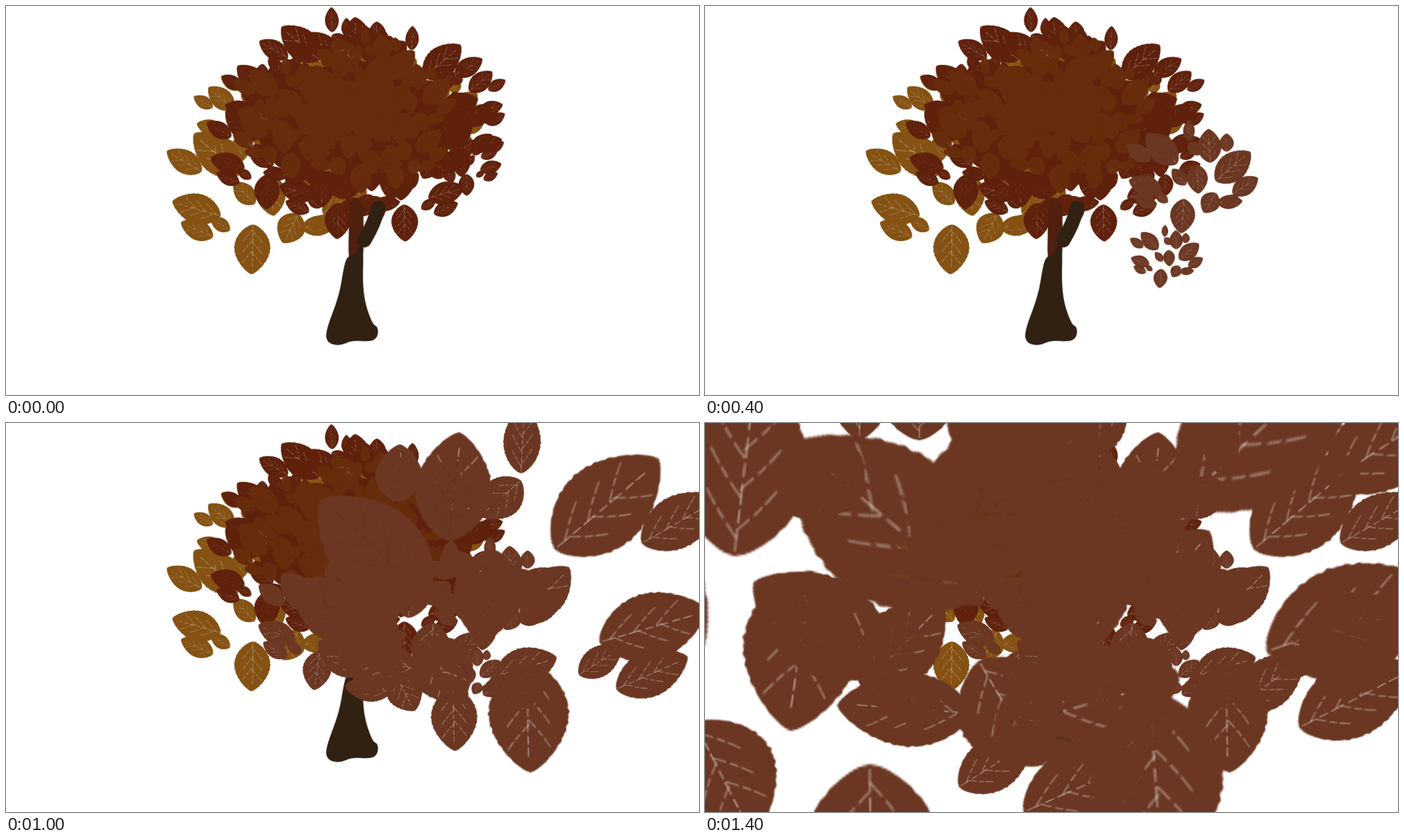
An HTML page with a canvas that plays this animation: 998 by 561 pixels, repeating every 1600 ms.

```html
<!DOCTYPE html>
<html lang="en">
<head>
<meta charset="utf-8">
<title>Autumn tree</title>
<style>
html, body { margin: 0; width: 100%; height: 100%; overflow: hidden; background: #fff; }
canvas { display: block; width: 998px; height: 561px; }
</style>
</head>
<body>
<canvas id="stage" width="998" height="561"></canvas>
<script>
const ctx = document.getElementById('stage').getContext('2d');
const STEP = 200, STEPS = 8, LEN = 80, PAD = 5;

// One leaf, pointing right; the veins are cut out so whatever lies below shows.
function makeLeaf(color) {
  const c = document.createElement('canvas');
  c.width = c.height = LEN + 2 * PAD;
  const g = c.getContext('2d');
  g.translate(PAD, PAD + LEN / 2);
  const edge = x => LEN / 2 * Math.sin(Math.PI * x ** 0.9) ** 0.7 *
    (1 + 0.012 * Math.sin(x * 71) + 0.012 * Math.sin(x * 113));
  g.beginPath();
  for (let i = 0; i <= 80; i++) g.lineTo(LEN * i / 80, -edge(i / 80));
  for (let i = 79; i > 0; i--) g.lineTo(LEN * i / 80, edge(i / 80));
  g.fillStyle = color;
  g.fill();

  g.globalCompositeOperation = 'destination-out';
  g.lineCap = 'round';
  g.lineWidth = 1.2;
  g.setLineDash([8, 4, 5, 3]);
  const vein = (x0, y0, x1, y1, alpha) => {
    g.strokeStyle = `rgba(0,0,0,${alpha})`;
    g.beginPath();
    g.moveTo(x0 * LEN, y0 * LEN);
    g.quadraticCurveTo((x0 + x1) / 2 * LEN, (y0 + (y1 - y0) * 0.6) * LEN, x1 * LEN, y1 * LEN);
    g.stroke();
  };
  vein(0.03, 0, 0.85, 0.02, 0.45);
  for (const x of [0.12, 0.34, 0.55])
    for (const side of [-1, 1]) vein(x + 0.02 * side, 0, x + 0.24, side * 0.27, 0.33);
  return c;
}

const red = makeLeaf('#5f210c'), mid = makeLeaf('#662c0b');
const gold = makeLeaf('#855213'), brown = makeLeaf('#6b3722');

// The brush motif: stem end, tip and width ratio of each leaf,
// measured from the middle of the lowest one.
const MOTIF = [
  [-1, -46, 2, 46, 0.72], [59, -62, 148, -89, 0.6], [73, -23, 132, -50, 0.58],
  [42, -35, 77, -58, 0.6], [94, -144, 158, -182, 0.58], [22, -139, 108, -214, 0.62],
  [-6, -202, -4, -258, 0.55], [-6, -196, -39, -166, 0.75], [-66, -146, -57, -236, 0.7],
  [-108, -178, -106, -226, 0.8], [-83, -98, -172, -180, 0.63], [-130, -66, -195, -112, 0.62],
  [-90, -40, -157, -48, 0.55], [-85, -66, -56, -12, 0.85], [-29, -139, -39, -62, 0.72],
  [-104, -40, -146, -62, 0.5], [-4, -84, 34, -124, 0.65]
];

function leaf(sprite, [x0, y0, x1, y1, w]) {
  const dx = x1 - x0, dy = y1 - y0, k = Math.hypot(dx, dy) / LEN;
  ctx.save();
  ctx.translate(x0, y0);
  ctx.rotate(Math.atan2(dy, dx));
  ctx.scale(k, k * w);
  ctx.drawImage(sprite, -PAD, -PAD - LEN / 2);
  ctx.restore();
}

// flip is 1 or -1
function stamp(sprite, x, y, size, flip = 1, turn = 0) {
  ctx.save();
  ctx.translate(x, y);
  ctx.rotate(turn);
  ctx.scale(size * flip, size);
  MOTIF.forEach(l => leaf(sprite, l));
  ctx.restore();
}

function seeded(seed) {
  return () => {
    seed = (seed * 16807) % 2147483647;
    return seed / 2147483647;
  };
}

// Stamps spread evenly over the middle of the crown
function scatter(sprite, count, size, seed) {
  const rnd = seeded(seed);
  for (let i = 0; i < count; i++) {
    const a = i * 2.4 + rnd(), r = Math.sqrt((i + 0.5) / count);
    const s = size * (0.85 + 0.3 * rnd()), flip = rnd() < 0.5 ? -1 : 1;
    const x = 490 + 118 * r * Math.cos(a), y = 162 + 70 * r * Math.sin(a);
    stamp(sprite, x + 20 * s * flip, y + 95 * s, s, flip);
  }
}

const crown = [
  [588, 189, 0.62], [466, 167, 0.64, -1], [659, 176, 0.38], [382, 183, 0.45, -1],
  [574, 313, 0.58], [478, 310, 0.57, -1], [655, 228, 0.4], [663, 258, 0.34],
  [376, 268, 0.55, -1]
];

// One more of these lands at every step
const sprays = [
  [656, 393, 0.3, -1, 0.07], [688, 303, 0.54, -1, 0.05], [448, 357, 0.62, -1, 0.12],
  [645, 427, 1], [752, 424, 1.74], [650, 518, 2.88, 1, -0.06], [240, 630, 3]
];

function blob(color, points) {
  const n = points.length;
  ctx.fillStyle = color;
  ctx.beginPath();
  for (let i = 0; i <= n; i++) {
    const [x, y] = points[i % n], [nx, ny] = points[(i + 1) % n];
    const mx = (x + nx) / 2, my = (y + ny) / 2;
    if (i) ctx.quadraticCurveTo(x, y, mx, my);
    else ctx.moveTo(mx, my);
  }
  ctx.fill();
}

function trunk() {
  ctx.save();
  ctx.shadowColor = 'rgba(48,33,18,.6)';
  ctx.shadowBlur = 2;
  blob('#4f200e', [[494, 279], [514, 279], [515, 325], [514, 375], [493, 375], [494, 320]]);
  blob('#302113', [
    [491, 361], [504, 359], [507, 347], [515, 345], [513, 415], [527, 459],
    [536, 463], [535, 478], [525, 484], [498, 482], [481, 490], [463, 486],
    [460, 470], [480, 418], [486, 380]
  ]);
  ctx.strokeStyle = '#302113';
  ctx.lineCap = 'round';
  ctx.lineWidth = 20;
  ctx.beginPath();
  ctx.moveTo(536, 291);
  ctx.quadraticCurveTo(531, 313, 516, 338);
  ctx.stroke();
  ctx.restore();
}

function draw(step) {
  ctx.fillStyle = '#fff';
  ctx.fillRect(0, 0, 998, 561);
  stamp(gold, 355, 351, 0.78, -1);
  stamp(gold, 337, 207, 0.42, -1);
  scatter(gold, 6, 0.52, 5);
  scatter(red, 9, 0.5, 11);
  crown.forEach(s => stamp(red, ...s));
  scatter(mid, 9, 0.42, 23);
  trunk();
  sprays.slice(0, step).forEach(s => stamp(brown, ...s));
}

ctx.imageSmoothingQuality = 'high';
const start = performance.now();
let shown = -1;
function tick() {
  const step = Math.floor((performance.now() - start) / STEP) % STEPS;
  if (step !== shown) draw(shown = step);
  requestAnimationFrame(tick);
}
tick();
</script>
</body>
</html>
```
